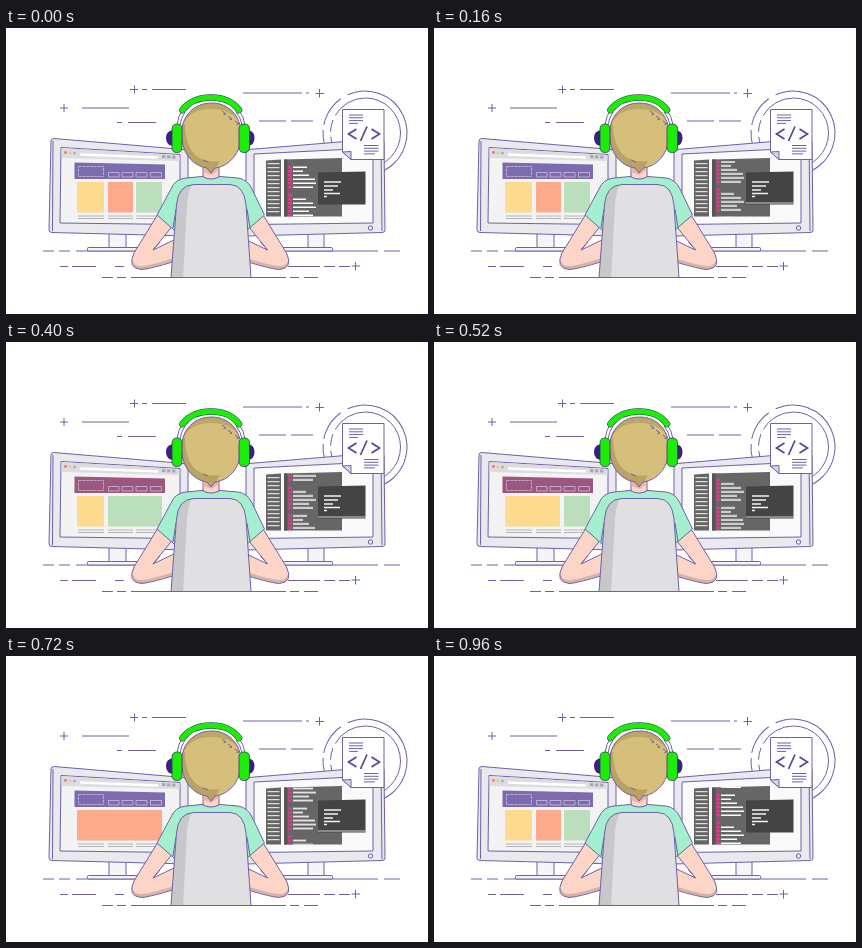
An HTML page for the animation above (1 s loop, 422 by 286 pixels).

```html
<!DOCTYPE html>
<html lang="en">
<head>
<meta charset="utf-8">
<title>Developer at work</title>
<style>
html, body { margin: 0; width: 100%; height: 100%; overflow: hidden; background: #fff; }
svg { display: block; width: 422px; height: 286px; }
.ln { fill: none; stroke: #6e61a8; stroke-width: 1; }
.ink { stroke: #6e61a8; stroke-width: 1; stroke-linejoin: round; }
.skin { fill: #fcd5c6; }
.mint { fill: #a4efcf; }
.phone { fill: #1bed08; }
.dark { fill: #3c1f80; }
.banner { animation: banner 1s step-end infinite; }
.yellow { fill: #fdda8d; animation: yellow 1s step-end infinite; }
.orange { fill: #fda98b; animation: orange 1s step-end infinite; }
.green { fill: #bbdfbc; animation: green 1s step-end infinite; }
.edge { animation: edge 1s step-end infinite; }
.code { animation: roll 1s linear infinite; }
@keyframes banner { 0%, 72% { fill: #7d6baf; } 32% { fill: #9c577f; } }
@keyframes yellow { 0%, 32%, 92% { width: 27px; } 52% { width: 55px; } 72% { width: 0; } }
@keyframes orange {
  0%, 92% { x: 102px; width: 25px; }
  32% { x: 102px; width: 0; }
  72% { x: 71px; width: 85px; }
}
@keyframes green {
  0%, 52%, 92% { x: 130px; width: 26px; }
  32% { x: 102px; width: 54px; }
  72% { x: 156px; width: 0; }
}
@keyframes edge { 0%, 92% { opacity: 0; } 4% { opacity: 1; } }
@keyframes roll {
  0%, 8% { transform: translateY(0); animation-timing-function: steps(21); }
  92%, 100% { transform: translateY(-56px); }
}
</style>
</head>
<body>
<svg viewBox="0 0 422 286">
  <defs>
    <path id="skull" d="M205.500 75C223 75 235 88 235 106C235 125 224 138 209 140L205 145L201 140C187 138 175.500 125 175.500 106C175.500 88 188 75 205.500 75Z"/>
    <path id="seat" d="M165 249.500L170.500 177Q172 157 188 156.500H224Q238 157 240 177L245 249.500Z"/>
    <path id="band" fill="none" stroke-linecap="round" d="M176.500 82Q186 69.500 205 69.500Q224 69.500 233 82"/>
    <clipPath id="panel"><path d="M278 131.500L336 130V188.500H278Z"/></clipPath>
    <clipPath id="head"><use href="#skull"/></clipPath>
    <clipPath id="back"><use href="#seat"/></clipPath>
  </defs>

  <!-- surrounding dashes -->
  <path class="ln" d="M124 61.500H132M128.500 57.500V65.500M136 61.500H141M146 61.500H180
    M54 80H62M58 76V84M76 80H123M111 94.500H116M122 94.500H150
    M237 65H296M300 65H303M309.500 65.500H318M313.500 61V69.500M253 93H280M285 93H307
    M37 223H48M53 223H64M70 223H145M270 223H372M378 223H394
    M54 238.500H62M66 238.500H90M109 238.500H118
    M282 238.500H314M318 238.500H329M333 238.500H344M345.500 238H354M349.500 234V242.500
    M96 249.500H107M111 249.500H120M125 249.500H280M284 249.500H293M298 249.500H312"/>

  <!-- badge rings, partly hidden by the monitor -->
  <circle class="ln" cx="359.500" cy="105" r="35" stroke-dasharray="106 5 12 5"/>
  <circle class="ln" cx="359" cy="105" r="42" stroke-dasharray="110 6 70 5 32 8" transform="rotate(-70 359 105)"/>

  <!-- left monitor -->
  <path class="ink" fill="#f5f5f8" d="M103 204H120V221H103Z"/>
  <rect class="ink" fill="#f5f5f8" x="81.500" y="219.500" width="51" height="3.500" rx="1"/>
  <path class="ink" fill="#e9e9ee" d="M48 110.500L178 121.500Q182 122 182 126V208L46 204.500Q43 204.500 43 201.500L45 113Q45 110.500 48 110.500Z"/>
  <path class="ln" d="M47 113L46.500 203"/>
  <path class="ink" fill="#f3f3f3" d="M55 119.500L174 126.500V196.500L54 195Z"/>
  <path fill="#dcdce1" d="M55.500 120L173.500 127V133L55.500 130Z"/>
  <path stroke="#fff" stroke-width="2.500" d="M74 126.500L152 129.500"/>
  <circle cx="59.500" cy="124.500" r="1.400" fill="#ed7770"/>
  <circle cx="64" cy="124.800" r="1.400" fill="#f3ca62"/>
  <circle cx="68.500" cy="125.100" r="1.400" fill="#82c989"/>
  <path stroke="#aaa9b3" stroke-width="3" stroke-dasharray="3.500 1.500" d="M156 128.500L170 129.200"/>
  <path class="banner" d="M68.500 134.500L159 136.500V151H68.500Z"/>
  <path fill="none" stroke="#d5c9e2" stroke-width=".7" stroke-dasharray="3 .8" d="M72.500 138.500H97.500V148.500H72.500Z"/>
  <path fill="none" stroke="#d5c9e2" stroke-width=".7" d="M102.500 144.500H113V149H102.500ZM116 144.500H127V149H116ZM130 144.500H141V149H130ZM144.500 144.500H155.500V149H144.500Z"/>
  <rect class="yellow" x="71" y="154" width="27" height="30.500"/>
  <rect class="green" x="130" y="154" width="26" height="30.500"/>
  <rect class="orange" x="102" y="154" width="25" height="30.500"/>
  <path stroke="#b5b5b9" stroke-width="1.200" d="M72 188H98M72 190.500H98M102 188H127M102 190.500H127M130 188H156M130 190.500H156"/>

  <!-- right monitor -->
  <path class="ink" fill="#f5f5f8" d="M302 204H318V221H302Z"/>
  <rect class="ink" fill="#f5f5f8" x="275.500" y="219.500" width="51" height="3.500" rx="1"/>
  <path class="ink" fill="#e9e9ee" d="M243 121.500L375 110.500Q378 110.500 378 114L379 202Q379 204.500 376 204.500L240 208V125Q240 122 243 121.500Z"/>
  <path class="ln" d="M375 113L376 203"/>
  <path class="ink" fill="#fafafa" d="M248 126L367 120V195L248 196.500Z"/>
  <circle class="ln" cx="364.500" cy="200" r="2.200"/>
  <path fill="#656565" d="M260 132.500L275 131.500V188.500H260Z"/>
  <path fill="none" stroke="#dedede" stroke-width="12" stroke-dasharray="1.200 2.800" d="M267.500 135V187"/>
  <path fill="#666667" d="M278 131.500L336 130V188.500H278Z"/>
  <path fill="#555556" d="M278 131.500H281.500V188.500H278Z"/>
  <g clip-path="url(#panel)"><g class="code" id="code"></g></g>
  <path fill="#444445" d="M312 144.500L359.500 143.500V176.500H312Z"/>
  <path stroke="#f2f2f2" stroke-width="1.300" d="M318 154H335M318 158H332M318 162H327M318 165.500H334M318 168.500H321"/>
  <path class="edge" stroke="#d0d0d0" d="M312 175H359.500"/>

  <!-- document -->
  <path class="ink" fill="#fff" d="M336.500 81.500H378V131.500H345L336.500 124Z"/>
  <path class="ink" fill="#d9d5e8" d="M336.500 124L345 123.500V131.500Z"/>
  <path class="ln" d="M343 87H357M343 89.800H357M343 92.600H357M343 95.400H352M358 117.500H372.500M358 120.300H372.500M358 123.100H372.500M358 125.900H369"/>
  <path fill="none" stroke="#54449a" stroke-width="1.700" d="M350.500 101L342.500 106L350.500 111M365.500 101L373.500 106L365.500 111M361 98.500L354.500 113"/>

  <!-- arms and shirt -->
  <g id="arm">
    <path class="skin" d="M152 186L128 225Q121 240 135 241.500Q142 241.500 170 233V211L147 222L168 196Z"/>
    <path fill="#d5b3a8" d="M126 231Q128 239 136 238Q146 237 168 230V233L139 241Q125 243 126 231Z"/>
    <path class="ln" d="M152 186L128 225Q121 240 135 241.500Q142 241.500 170 233V211L147 222L168 196M147 222L154 214"/>
  </g>
  <use href="#arm" transform="translate(408.500 0) scale(-1 1)"/>
  <path class="ink mint" d="M196 148.500H214L232 150Q241 151 246 161L258.500 187L241 202H168L151 187L165 161Q169 151 180 150Z"/>
  <path class="ln" d="M170 181L167 200M241 181L244 200"/>
  <path class="ink skin" d="M197 134H213V149Q205 153 197 149Z"/>
  <path fill="#e9b5a6" d="M197.500 137H212.500V142L205.500 147L197.500 144Z"/>

  <!-- chair -->
  <g clip-path="url(#back)">
    <path fill="#e0e0e2" d="M160 150H250V252H160Z"/>
    <path fill="#c8c8cb" d="M160 150H190Q182 160 181 177L177 252H160Z"/>
  </g>
  <use class="ln" href="#seat"/>

  <!-- head and headphones -->
  <g clip-path="url(#head)">
    <path fill="#d5bf7b" d="M170 70H240V150H170Z"/>
    <path fill="#b8a266" d="M170 96H179Q179 120 192 129Q201 135 214 133L205 148H170Z"/>
    <path fill="#bca76a" d="M170 100V70H240V100L235 96Q226 81 205 81Q184 81 177 97Z"/>
  </g>
  <use class="ln" href="#skull"/>
  <path class="ln" d="M216 83L220 86L217.500 86.500M222 88L226 91L223.500 91.500M229 93L233 96L230.500 96.500M197 132L202 134"/>
  <path class="ln" d="M171 97Q172 88 177 81M239 97Q238 88 232 81M174 97Q175 90 179 84M236 97Q235 90 230 84"/>
  <use href="#band" stroke="#39336c" stroke-width="6.600"/>
  <use href="#band" stroke="#1bed08" stroke-width="5.600"/>
  <path class="dark" d="M167 102Q160 103 160 110Q160 117 167 118ZM242 102Q248.500 103 248.500 110Q248.500 117 242 118Z"/>
  <g stroke="#39336c" stroke-width=".8">
    <rect class="phone" x="166" y="96" width="10" height="28.500" rx="4.500"/>
    <rect class="phone" x="233" y="96" width="10.500" height="28.500" rx="4.500"/>
  </g>
</svg>
<script>
const code = document.getElementById('code');
const widths = [0, 14, 10, 16, 22, 23, 20, 0, 0, 13, 20, 23, 16, 20];
const period = 56;

function bar(x, y, width, height, fill) {
  const r = document.createElementNS('http://www.w3.org/2000/svg', 'rect');
  const box = { x, y, width, height, fill };
  for (const key in box) r.setAttribute(key, box[key]);
  code.append(r);
}

for (let page = 0; page < 3; page++) {
  widths.forEach((w, i) => {
    const y = 134.5 + i * 4 + page * period;
    if (w) bar(287, y, w, 1.5, '#fff');
    if (i % 7) bar(282, y - 0.5, 4, 2.6, '#e0388a');
  });
}
</script>
</body>
</html>
```
